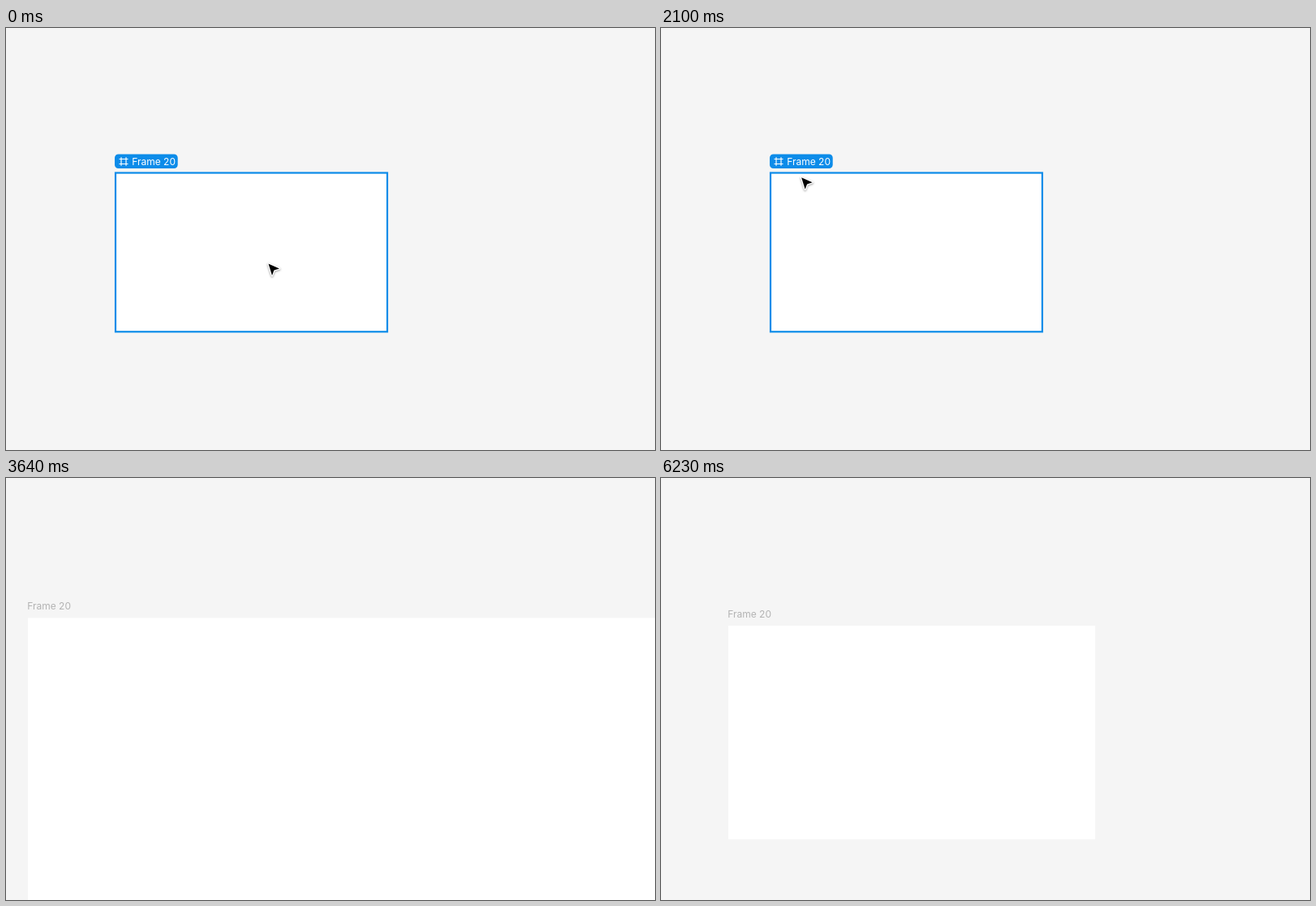
These frames come from a looping animation (800x520 px, 6.37 s). An HTML page with a canvas:

```html
<!DOCTYPE html>
<html lang="en">
<head>
<meta charset="utf-8">
<title>Canvas zoom</title>
<style>
  html, body { margin: 0; width: 100%; height: 100%; overflow: hidden; background: #f5f5f5; }
  canvas { display: block; }
</style>
</head>
<body>
<canvas id="stage" width="800" height="520"></canvas>
<script>
const ctx = document.getElementById('stage').getContext('2d');
const LOOP = 6370, STEP = 70, BLUE = '#0c8ce9';

const easeInOut = p => p < 0.5 ? 4 * p ** 3 : 1 - 4 * (1 - p) ** 3;
const easeOut = p => 1 - (1 - p) ** 4;
const within = (t, from, to) => t >= from && t < to;

// Blends a state through successive legs, each { from, to, end }.
function follow(state, legs, ease, t) {
  for (const { from, to, end } of legs) {
    const p = ease(Math.min(1, Math.max(0, (t - from) / (to - from))));
    state = state.map((v, i) => v + (end[i] - v) * p);
  }
  return state;
}

const pointerAt = t => follow([323, 290], [
  { from: 280, to: 420, end: [219, 269] },
  { from: 490, to: 700, end: [168, 233] },
  { from: 770, to: 1190, end: [135, 173] },
  { from: 1470, to: 1750, end: [62, 181] },
  { from: 1890, to: 2170, end: [180, 184] },
  { from: 3220, to: 3500, end: [117, 187] },
  { from: 5320, to: 5880, end: [287, 518] }
], easeInOut, t);

// left, top, zoom
const viewAt = t => follow([136, 179.5, 1], [
  { from: 2660, to: 3150, end: [29, 176, 3.25] },
  { from: 3220, to: 3500, end: [27, 172.5, 3.45] },
  { from: 4270, to: 4680, end: [83, 182, 1.358] }
], easeOut, t);

const arrow = new Path2D('M.5 .5 L14 6.4 L7.4 8.6 L5 15 Z');
const hand = new Path2D(
  'M-3.2 8 C-3.4 6 -5.2 4.6 -6 3 C-6.8 1.4 -8.2 .6 -7.6 -.6 C-6.8 -1.6 -5.4 -.6 -4.4 .8 ' +
  'L-5.4 -4.4 C-5.8 -6.4 -3.6 -7 -3 -5 L-2.4 -6.6 C-2.4 -8.6 -.2 -8.6 0 -6.8 ' +
  'C.4 -8.6 2.8 -8.4 2.8 -6.2 L2.8 -4.8 C3.6 -6.8 5.8 -6.2 5.6 -4.2 ' +
  'L5.8 1 C5.8 4 4.4 5 4 8 Z');
const fingers = new Path2D('M-3 -5 L-2 -1 M0 -6.8 L.3 -1.2 M2.8 -5 L2.4 -1');

function drawPointer([x, y], isHand) {
  const shape = isHand ? hand : arrow;
  ctx.save();
  ctx.translate(x, y);
  ctx.lineJoin = 'round';
  ctx.shadowColor = 'rgba(0,0,0,.4)';
  ctx.shadowBlur = 2.5;
  ctx.shadowOffsetY = 1;
  ctx.strokeStyle = '#fff';
  ctx.lineWidth = 2.6;
  ctx.stroke(shape);
  ctx.shadowColor = 'transparent';
  ctx.fillStyle = isHand ? '#fff' : '#000';
  ctx.fill(shape);
  if (isHand) {
    ctx.strokeStyle = '#000';
    ctx.lineWidth = 1.2;
    ctx.stroke(hand);
    ctx.stroke(fingers);
  }
  ctx.restore();
}

function drawLabel(x, y, active) {
  ctx.font = '12px Inter, sans-serif';
  if (!active) {
    ctx.fillStyle = '#b3b3b3';
    ctx.fillText('Frame 20', x - 0.8, y - 10.5);
    return;
  }
  ctx.fillStyle = BLUE;
  ctx.beginPath();
  ctx.roundRect(x - 2, y - 24, 77.7, 17.5, 4.5);
  ctx.fill();
  ctx.strokeStyle = ctx.fillStyle = '#fff';
  ctx.lineWidth = 1.2;
  ctx.beginPath();
  for (const d of [-3, 3]) {
    ctx.moveTo(x + 9 + d, y - 20.3);
    ctx.lineTo(x + 9 + d, y - 9.8);
    ctx.moveTo(x + 3.5, y - 15 + d);
    ctx.lineTo(x + 14.5, y - 15 + d);
  }
  ctx.stroke();
  ctx.fillText('Frame 20', x + 19.2, y - 10.7);
}

function draw(t) {
  const [x, y, zoom] = viewAt(t);
  const w = 333 * zoom, h = 193.8 * zoom;
  const hovered = t < 1610 || within(t, 1960, 2170) || within(t, 5390, 5810);

  ctx.fillStyle = '#f5f5f5';
  ctx.fillRect(0, 0, 800, 520);
  ctx.fillStyle = '#fff';
  ctx.fillRect(x, y, w, h);
  if (hovered) {
    ctx.strokeStyle = BLUE;
    ctx.lineWidth = 2.2;
    ctx.strokeRect(x - 1, y - 1, w + 2, h + 2);
  }
  drawLabel(x, y, hovered || within(t, 5250, 5390));

  const isHand = within(t, 2730, 3290) || within(t, 4130, 5180);
  const hidden = within(t, 2310, 2730) || within(t, 3640, 4130) || t >= 5950;
  if (!hidden) drawPointer(pointerAt(t), isHand);
}

const start = performance.now();
function tick() {
  const t = (performance.now() - start) % LOOP;
  draw(Math.floor(t / STEP) * STEP);
  requestAnimationFrame(tick);
}
tick();
</script>
</body>
</html>
```
